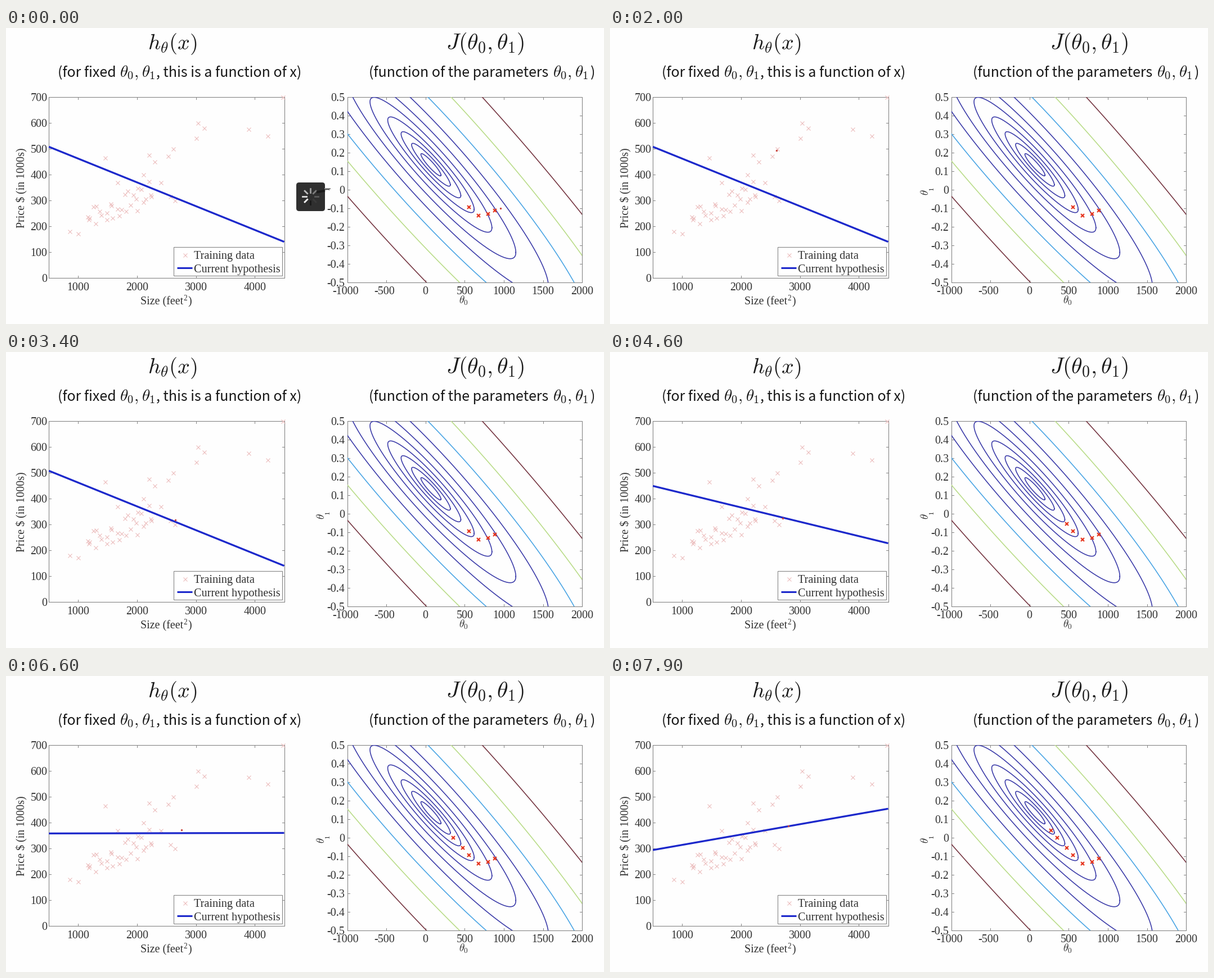
A matplotlib script that plays this animation: 1063x527 px, repeating every 8 s.

```python
import numpy as np
import matplotlib.pyplot as plt
from matplotlib.animation import FuncAnimation
from matplotlib.patches import FancyBboxPatch, Rectangle

W, H, DPI = 1063, 527, 64
PT = 72 / DPI          # points per pixel
STEP, LOOP = 100, 8000

plt.rcParams["mathtext.fontset"] = "cm"
SERIF = "Liberation Serif"
SANS = ["Noto Sans CJK JP", "DejaVu Sans"]
INK, FRAME, BLUE = "#303030", "#858585", "#1c28cb"
PINK, RED = "#ecbdbd", "#e63a22"

fig = plt.figure(figsize=(W / DPI, H / DPI), dpi=DPI, facecolor="#fefefe")
ax = fig.add_axes([0, 0, 1, 1])
ax.set_xlim(0, W)
ax.set_ylim(H, 0)
ax.axis("off")


def text(x, y, s, px, family=SERIF, color=INK, ha="left", va="baseline", **kw):
    return ax.text(x, y, s, fontsize=px * PT, family=family, color=color,
                   ha=ha, va=va, **kw)


def line(x, y, color, px, **kw):
    return ax.plot(x, y, color=color, lw=px * PT, **kw)[0]


def crosses(x, y, color, size, px, **kw):
    return ax.plot(x, y, "x", color=color, ms=size * PT, mew=px * PT, **kw)[0]


def plot_frame(x0, y0, x1, y1, xticks, yticks, tick=4):
    """Box with inward ticks on all four sides."""
    ax.add_patch(Rectangle((x0, y0), x1 - x0, y1 - y0, fill=False,
                           ec=FRAME, lw=1.1 * PT, zorder=2))
    for x in xticks:
        line([x, x, np.nan, x, x], [y1, y1 - tick, np.nan, y0, y0 + tick],
             FRAME, 1, zorder=2)
    for y in yticks:
        line([x0, x0 + tick, np.nan, x1, x1 - tick], [y, y, np.nan, y, y],
             FRAME, 1, zorder=2)


# Headings
text(252, 38, r"$h_\theta(x)$", 38.5, color="#1c1c1c")
text(782, 38, r"$J(\theta_0,\theta_1)$", 39.8, color="#1c1c1c")
text(92, 87, "(for fixed", 25, SANS, "#181818")
text(202, 87, r"$\theta_0,\theta_1$", 29.3, color="#181818")
text(267, 87, ", this is a function of x)", 25, SANS, "#181818")
text(645, 87, "(function of the parameters", 25, SANS, "#181818")
text(972, 87, r"$\theta_0,\theta_1$", 29.3, color="#181818")
text(1039, 87, ")", 25, SANS, "#181818")

# Left plot: price against size
LX0, LX1, LY0, LY1 = 76.2, 494.5, 122.7, 444.6


def left_xy(size, price):
    return (LX0 + (LX1 - LX0) * (np.asarray(size) - 500) / 4000,
            LY1 - (LY1 - LY0) * np.asarray(price) / 700)


sizes, prices = np.arange(1000, 5000, 1000), np.arange(0, 800, 100)
plot_frame(LX0, LY0, LX1, LY1, left_xy(sizes, 0)[0], left_xy(500, prices)[1])
for size in sizes:
    text(left_xy(size, 0)[0], 467, str(size), 20, ha="center")
for price in prices:
    text(73.5, left_xy(500, price)[1] + 7, str(price), 20, ha="right")
text(28.5, 285, r"Price \$ (in 1000s)", 20, ha="center", va="center",
     rotation=90)
text(239, 492, "Size (feet", 20)
text(315.5, 485, "2", 13.5)
text(323, 492, ")", 20)

# A dense band of homes along a rising trend, and the ones far from it
rng = np.random.default_rng(4)
band = np.linspace(1120, 2260, 30) + rng.uniform(-60, 60, 30)
crosses(*left_xy(band, 105 + 0.1 * band + rng.uniform(-50, 50, 30)),
        PINK, 7, 1.1, zorder=3)
APART = [(852, 180), (1000, 170), (1458, 465), (1664, 369), (2104, 400),
         (2200, 475), (2300, 450), (2400, 369), (2526, 470), (2567, 315),
         (2609, 500), (2637, 300), (3000, 540), (3031, 600), (3137, 580),
         (3890, 575), (4215, 549), (4478, 700)]
crosses(*left_xy(*np.transpose(APART)), PINK, 7, 1.1, zorder=3)
hypothesis = line([LX0, LX1], [0, 0], BLUE, 3.3, zorder=4,
                  solid_capstyle="butt")

# Legend
ax.add_patch(Rectangle((298, 390), 192.5, 50.5, fc="white", ec=FRAME,
                       lw=1.1 * PT, zorder=5))
crosses([318], [404], PINK, 7, 1.1, zorder=6)
line([304, 331], [427, 427], BLUE, 3.1, zorder=6, solid_capstyle="butt")
text(334, 411, "Training data", 20.3, zorder=6)
text(334, 435, "Current hypothesis", 20.2, zorder=6)

# Right plot: cost contours
RX0, RX1, RY0, RY1 = 606.5, 1024.2, 122.8, 453.4


def right_xy(theta0, theta1):
    return (RX0 + (RX1 - RX0) * (theta0 + 1000) / 3000,
            RY1 - (RY1 - RY0) * (theta1 + 0.5))


right_x = np.linspace(RX0, RX1, 7)
right_y = np.linspace(RY1, RY0, 11)
plot_frame(RX0, RY0, RX1, RY1, right_x, right_y)
for i, x in enumerate(right_x):
    text(x - (3 if i < 2 else 0), 474.5, str(-1000 + 500 * i), 20, ha="center")
for i, y in enumerate(right_y):
    text(602, y + 7, f"{(i - 5) / 10:g}", 20, ha="right")
text(805, 491, r"$\theta_0$", 19)
text(561, 293, r"$\theta$", 19, ha="center", va="center", rotation=90)
text(572, 286, "1", 13, ha="center", va="center", rotation=90)

# Levels fall geometrically towards the lowest cost
clip = Rectangle((RX0, RY0), RX1 - RX0, RY1 - RY0, transform=ax.transData)
turn = np.linspace(0, 2 * np.pi, 721)
tilt = np.arccos(0.933)
shades = ["#743440", "#b9dc88", "#48a4e4"] + ["#3a3aa8"] * 7
for k, shade in enumerate(shades):
    a = np.sqrt(298750 / 1.89 ** k - 650)
    curve = line(755.4 + a * np.cos(turn),
                 243.5 + a / 0.902 * np.cos(turn - tilt),
                 shade, 1.6, zorder=3)
    curve.set_clip_path(clip)

# Descent path: time reached, theta0, theta1
DESCENT = [(0, 885, -0.111), (0, 799, -0.130), (0, 676, -0.139),
           (0, 553, -0.092), (3600, 476, -0.0555), (5200, 357, 0.0005),
           (7000, 273, 0.040)]
marks = [crosses(*[[v] for v in right_xy(t0, t1)], RED, 6.5, 2.2, zorder=4)
         for _, t0, t1 in DESCENT]

# Pointer stops: arrival time, x, y
STOPS = [(0, 879, 321), (800, 882, 286), (2000, 296, 218), (3400, 301, 299),
         (4200, 307, 296), (6200, 312, 274), (7900, 317, 267)]
GLIDE = 500
pointer, = ax.plot([], [], "o", color="#c8433c", ms=3.4 * PT, mew=0, zorder=7)

# Loading badge, its spokes fading around the ring
badge = [ax.add_patch(FancyBboxPatch(
    (520, 279), 43, 43, boxstyle="round,pad=4,rounding_size=5",
    fc="#2f2f2f", ec="none", zorder=8))]
for i in range(8):
    c, s = np.cos(i * np.pi / 4), np.sin(i * np.pi / 4)
    shade = 1 - 0.9 * ((i - 3) % 8) / 7
    badge.append(line([541 + 7.5 * c, 541 + 14 * c],
                      [300 + 7.5 * s, 300 + 14 * s], str(shade), 2.8,
                      zorder=9))
badge.append(line([554, 565], [292, 290], "#1b1b1b", 4, zorder=9))
badge.append(line([567, 576], [286, 286], "#8c8c8c", 2, zorder=9))


def pointer_at(ms):
    pos = np.array(STOPS[0][1:], float)
    for arrive, x, y in STOPS[1:]:
        u = np.clip((ms - arrive + GLIDE) / GLIDE, 0, 1)
        pos += (np.array([x, y]) - pos) * u * u * (3 - 2 * u)
    return pos


def update(i):
    ms = i * STEP
    for mark, (at, _, _) in zip(marks, DESCENT):
        mark.set_visible(ms >= at)
    _, t0, t1 = [d for d in DESCENT if d[0] <= ms][-1]
    ends = np.array([500, 4500])
    hypothesis.set_data(*left_xy(ends, t0 + t1 * ends))
    x, y = pointer_at(ms)
    pointer.set_data([x], [y])
    for part in badge:
        part.set_visible(ms < STEP)
    return [hypothesis, pointer, *badge, *marks]


anim = FuncAnimation(fig, update, frames=LOOP // STEP, interval=STEP,
                     init_func=lambda: update(0), repeat=True, repeat_delay=0)
plt.show()
```
